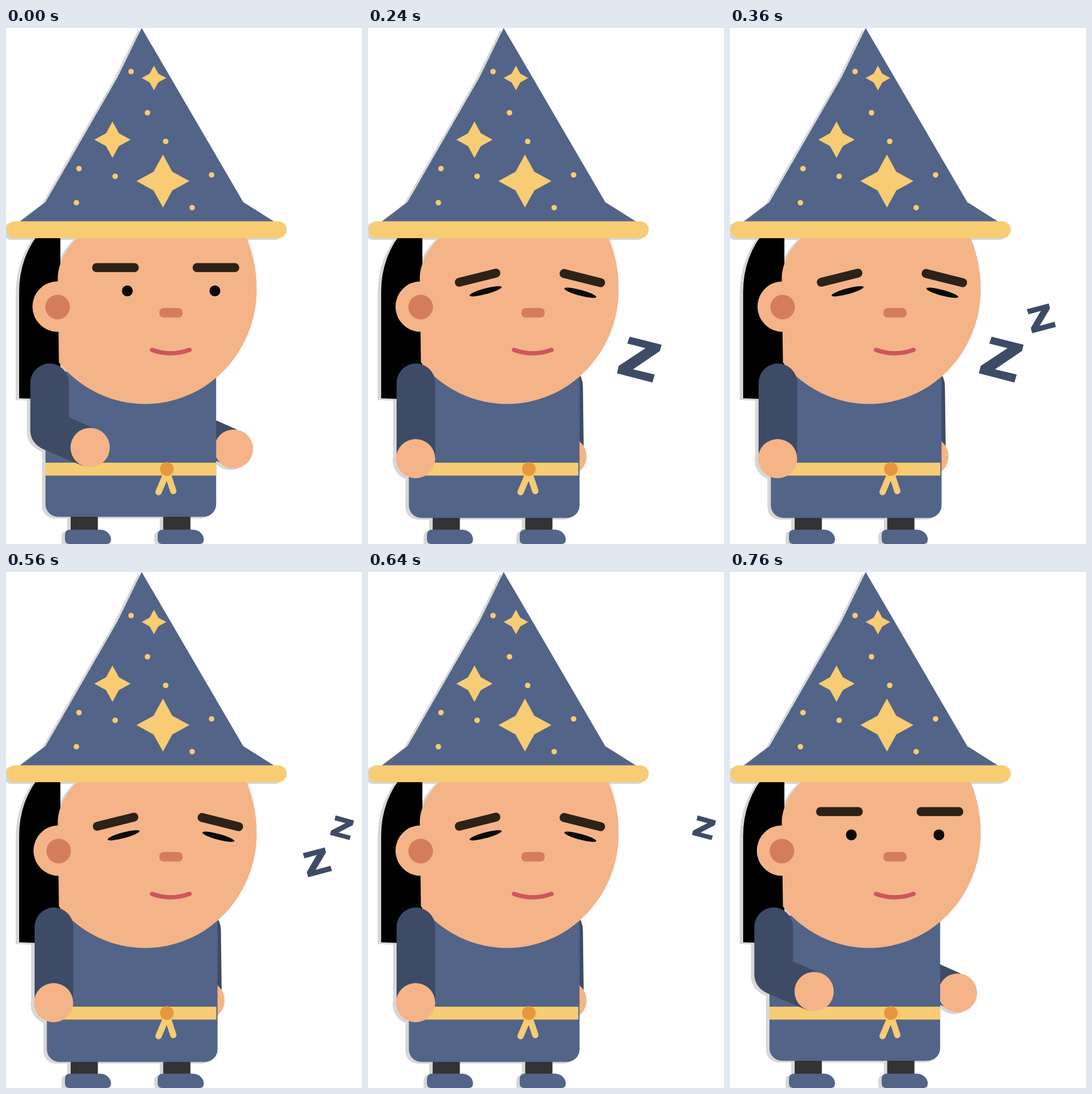
Animation of 622x901 px, one loop 800 ms. Source, as an HTML page:

```html
<!DOCTYPE html>
<html lang="en">
<head>
<meta charset="utf-8">
<title>Sleepy wizard</title>
<style>
  html, body { margin: 0; width: 100%; height: 100%; overflow: hidden; background: #fff; }
  svg { display: block; width: 622px; height: 901px; }
  #wizard { filter: drop-shadow(-6px 3px 0 #d7d7d7); }
  .robe { fill: #526488; }
  .sleeve { fill: #3e4b66; }
  .skin { fill: #f4b488; }
  .blush { fill: #d47d5c; }
  .gold { fill: #f7cc73; }
  .brow { fill: #2c2217; }
  .eye { fill: #0a0a0a; }
  .asleep .when-awake, svg:not(.asleep) .when-asleep { display: none; }
  .asleep #body { transform: translate(2.4px, 2px); }
</style>
</head>
<body>
<svg id="stage" viewBox="0 0 622 901">
  <defs>
    <rect id="brow" x="-40.7" y="-7.8" width="81.4" height="15.6" rx="7.5"/>
    <path id="shoe" d="M112 876H164A19.5 17 0 0 1 183.5 893Q183.5 901 176 901H111Q103 901 103 893V885Q103 876 112 876Z"/>
  </defs>

  <g id="wizard">
    <path d="M64 350Q23 398 23 460V646.5L60 648H95V350Z"/>

    <g class="when-awake">
      <path class="sleeve" d="M360 682L403 701 380 762 360 752Z"/>
      <circle class="skin" cx="397.8" cy="735" r="34"/>
    </g>
    <g class="when-asleep">
      <path class="sleeve" d="M340 600H366Q375.5 611 375.5 626L376.8 730H340Z"/>
      <circle class="skin" cx="348" cy="748" r="34"/>
    </g>

    <path fill="#333" d="M113 840h47.5v40h-47.5zM274.7 840h47.6v40h-47.6z"/>
    <use href="#shoe" class="robe"/>
    <use href="#shoe" class="robe" x="162"/>
    <path id="body" class="robe" d="M69 600H367.2V831.5A22 22 0 0 1 345.2 853.5H91A22 22 0 0 1 69 831.5Z"/>

    <path class="gold" d="M69 759H367.5V781.5H69Z"/>
    <path fill="none" stroke="#f7cc73" stroke-width="11" stroke-linecap="round" d="M279 781L266.5 810.5M283 780L292.3 808.5"/>
    <circle cx="281" cy="770" r="12" fill="#e8963e"/>

    <path class="skin" d="M145 347L124 367C104 387 90.5 412 90.5 438L92.5 584A195 199.5 0 0 0 243 656.5A195 199.5 0 0 0 438 457C438 417 430 385 414 352Z"/>
    <g id="ear">
      <circle class="skin" cy="486.5" r="44"/>
      <circle class="blush" cy="487.3" r="21.5"/>
    </g>

    <g class="when-awake">
      <use href="#brow" class="brow" x="191.2" y="418.4"/>
      <use href="#brow" class="brow" x="366.8" y="418.4"/>
      <circle class="eye" cx="212" cy="459" r="9.5"/>
      <circle class="eye" cx="365" cy="459" r="9.5"/>
    </g>
    <g class="when-asleep">
      <use href="#brow" class="brow" transform="translate(191.5 436) rotate(-14)"/>
      <use href="#brow" class="brow" transform="translate(374.5 436.7) rotate(14)"/>
      <ellipse class="eye" rx="29" ry="5" transform="translate(205.5 459.7) rotate(-15)"/>
      <ellipse class="eye" rx="29" ry="5" transform="translate(371 462.3) rotate(15)"/>
    </g>

    <rect class="blush" x="268" y="489" width="40.6" height="16.5" rx="7"/>
    <path fill="none" stroke="#cc565f" stroke-width="7.5" stroke-linecap="round" d="M255 562Q288 574 320.7 562"/>

    <g class="when-awake">
      <path class="sleeve" d="M42.5 618A33.8 34 0 0 1 110 618V680L152 698 135 765 66 736Q42.5 725 42.5 702Z"/>
      <circle class="skin" cx="147" cy="732.5" r="34.3"/>
    </g>
    <g class="when-asleep">
      <path class="sleeve" d="M50 618A33.8 34 0 0 1 117.5 618V750H50Z"/>
      <circle class="skin" cx="83.2" cy="752" r="34.2"/>
    </g>

    <path class="robe" d="M237 0L414.5 304 470 339H23L69 304 195 86Z"/>
    <rect class="gold" x="1" y="337.5" width="489.5" height="29.5" rx="14.75"/>
    <g id="sparkles" class="gold"></g>
  </g>

  <g id="snores" class="sleeve">
    <path d="M457 539L513 553 510 564 463 596 501 605 497 619 435 603 438 590 485 559 453 551Z"/>
    <path d="M518.5 491L557 481 559 490 541 520 567 513 569.5 522 528 533 525.5 524 543 494 521.5 500Z"/>
    <path d="M576 425L608 434 606 442 581 455 602.5 460.5 600 468 566 459 568 451.5 593 438.5 574 433.5Z"/>
  </g>
</svg>

<script>
  const stage = document.getElementById('stage');
  const ear = document.getElementById('ear');
  const snores = [...document.getElementById('snores').children];
  const LOOP = 800, SLEEP = 160, WAKE = 760;
  const SNORE_TIMES = [[240, 560], [360, 640], [480, 720]];

  function star(x, y, size) {
    const points = Array.from({ length: 8 }, (_, i) => {
      const radius = i % 2 ? size * 0.5 : size;
      const angle = i * Math.PI / 4;
      return [x + radius * Math.sin(angle), y - radius * Math.cos(angle)];
    });
    return `<polygon points="${points.join(' ')}"/>`;
  }

  const stars = [[258.5, 87.3, 21.5], [186, 195, 31.7], [274.2, 267.3, 46.3]];
  const dots = [[218.5, 76], [247.2, 148], [279, 198], [127.5, 245.5],
                [190.7, 259], [359.2, 256.5], [123, 305], [325.3, 313.7]];
  document.getElementById('sparkles').innerHTML =
    stars.map(s => star(...s)).join('') +
    dots.map(([x, y]) => `<circle cx="${x}" cy="${y}" r="4.8"/>`).join('');

  function draw() {
    const t = performance.now() % LOOP;
    const asleep = t >= SLEEP && t < WAKE;
    stage.classList.toggle('asleep', asleep);
    ear.setAttribute('transform', `translate(${asleep ? 92 : t < SLEEP ? 90.2 : 90.8} 0)`);
    snores.forEach((z, i) => {
      const [from, to] = SNORE_TIMES[i];
      z.style.display = t >= from && t < to ? '' : 'none';
    });
    requestAnimationFrame(draw);
  }
  draw();
</script>
</body>
</html>
```
